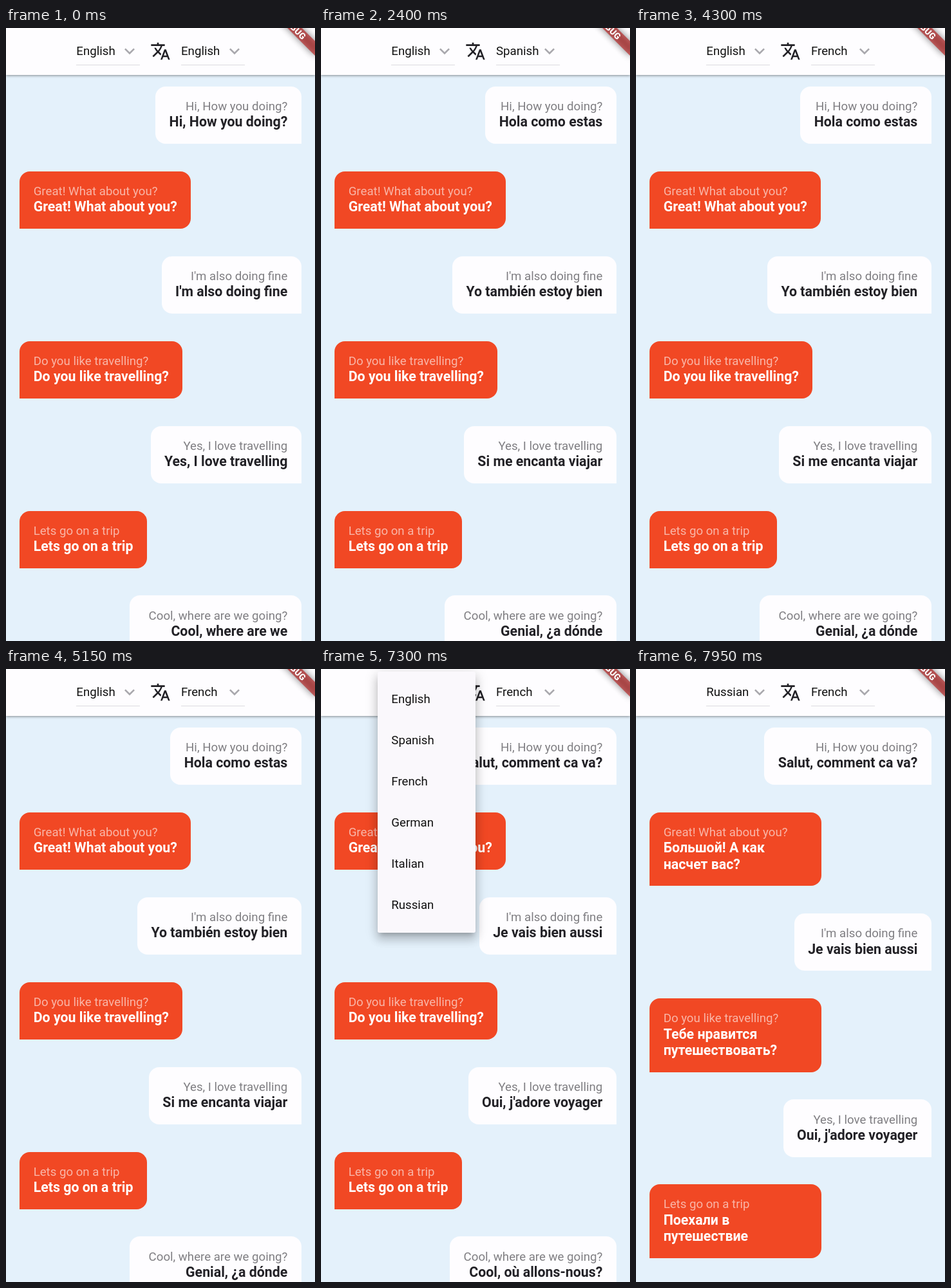
Recreate the animation shown at these times as an HTML page. Size 480 by 953 pixels, loop 8 s.

```html
<!DOCTYPE html>
<html lang="en">
<head>
<meta charset="utf-8">
<title>Chat translation</title>
<style>
html, body { margin: 0; width: 100%; height: 100%; overflow: hidden; }
body { position: relative; background: #e4f1fb; font: 18.667px/21.333px Roboto, sans-serif; color: #111; }
div, svg { position: absolute; box-sizing: border-box; white-space: pre; }
#chat { left: 21.333px; top: 90.667px; width: 437.333px; display: flex; flex-direction: column; align-items: flex-end; }
#chat div { position: static; }
#chat .bubble {
  padding: 21.333px; margin-bottom: 42.667px; text-align: right;
  background: #fefdff; border-radius: 16px 16px 0 16px;
}
#chat .red { align-self: flex-start; text-align: left; background: #f14824; border-radius: 16px 16px 16px 0; }
.plain { color: #7f7e82; }
.bold { font-weight: 700; font-size: 21.333px; line-height: 25.333px; color: #222126; }
.red .plain { color: rgba(255, 255, 255, .6); }
.red .bold { color: #fff; }
#bar { left: 0; top: 0; width: 100%; height: 73.3px; background: #fefdff; box-shadow: 0 1px 4px rgba(0, 0, 0, .45); }
.pick { top: 15px; width: 98.667px; height: 42.667px; line-height: 42.667px; border-bottom: 1.333px solid #dcdbe0; }
.pick svg { right: 0; top: 5.3px; }
.menu { top: 4.333px; width: 152px; height: 405.333px; }
.panel {
  left: 0; width: 100%; background: #faf8fc; border-radius: 2.667px;
  box-shadow: 0 6.7px 6.7px -4px rgba(0, 0, 0, .2), 0 10.7px 13.3px 1.3px rgba(0, 0, 0, .14), 0 4px 18.7px 2.7px rgba(0, 0, 0, .12);
}
.item { left: 21.333px; line-height: 64px; }
#corner { left: 480px; top: -32px; transform: rotate(45deg); transform-origin: 0 0; }
#corner div { left: -53.333px; top: 37.333px; width: 106.667px; height: 16px; }
#corner .shade { background: rgba(0, 0, 0, .5); filter: blur(5.3px); }
#corner .ribbon { background: rgba(183, 28, 28, .627); color: #fff; font-size: 13.6px; font-weight: 900; line-height: 16px; text-align: center; }
</style>
</head>
<body>
<div id="chat"></div>
<div id="bar">
  <svg style="left:224px;top:20px" width="32" height="32" viewBox="0 0 24 24" fill="#222126"><path d="M12.87 15.07l-2.54-2.51.03-.03c1.74-1.94 2.98-4.17 3.71-6.53H17V4h-7V2H8v2H1v1.99h11.17C11.5 7.92 10.44 9.75 9 11.35 8.07 10.32 7.3 9.19 6.69 8h-2c.73 1.63 1.73 3.17 2.98 4.56l-5.09 5.02L4 19l5-5 3.11 3.11.76-2.04zM18.5 10h-2L12 22h2l1.12-3h4.75L21 22h2l-4.5-12zm-2.62 7l1.62-4.33L19.12 17h-3.24z"/></svg>
</div>
<div id="corner"><div class="shade"></div><div class="ribbon">DEBUG</div></div>
<script>
const LOOP = 8000, STEP = 50;
const LANGS = ['English', 'Spanish', 'French', 'German', 'Italian', 'Russian'];
const ITEM = 64, PAD = 10.667, FULL = LANGS.length * ITEM + 2 * PAD;

// Even lines are replies on the right; each text starts at its language's time.
const LINES = [
  ['Hi, How you doing?', 'Hola como estas', 'Salut, comment ca va?'],
  ['Great! What about you?', 'Большой! А как\nнасчет вас?'],
  ["I'm also doing fine", 'Yo también estoy bien', 'Je vais bien aussi'],
  ['Do you like travelling?', 'Тебе нравится\nпутешествовать?'],
  ['Yes, I love travelling', 'Si me encanta viajar', "Oui, j'adore voyager"],
  ['Lets go on a trip', 'Поехали в\nпутешествие'],
  ['Cool, where are we\ngoing?', 'Genial, ¿a dónde\nvamos?', 'Cool, où allons-nous?']
];
const RIGHT_TIMES = [0, 2250, 5200], LEFT_TIMES = [0, 7750], STAGGER = 25;

const PICKS = [
  { x: 109.333, labels: [[0, 'English'], [7450, 'Russian']] },
  { x: 272, labels: [[0, 'English'], [2000, 'Spanish'], [4150, 'French']] }
];

// start: when growth begins; from: first visible; close: fade out begins
const MENUS = [
  { x: 250.667, sel: 0, start: 850, from: 900, close: 1975 },
  { x: 250.667, sel: 1, start: 3667, from: 3800, close: 4125 },
  { x: 88, sel: 0, start: 6366, from: 6450, close: 7425 }
];

const add = (parent, cls, text = '') => {
  const el = document.createElement('div');
  el.className = cls;
  el.textContent = text;
  parent.append(el);
  return el;
};
const clamp = v => Math.min(1, Math.max(0, v));
const span = (v, a, b) => clamp((v - a) / (b - a));
const mix = (a, b, p) => a + (b - a) * p;
const setText = (el, text) => { if (el.textContent !== text) el.textContent = text; };

const chat = document.getElementById('chat'), bar = document.getElementById('bar');
const corner = document.getElementById('corner');

const bubbles = LINES.map((texts, i) => {
  const box = add(chat, i % 2 ? 'bubble red' : 'bubble');
  add(box, 'plain', texts[0].replace('\n', ' '));
  return { box, bold: add(box, 'bold'), texts, times: i % 2 ? LEFT_TIMES : RIGHT_TIMES, lag: i * STAGGER };
});

for (const p of PICKS) {
  const box = add(bar, 'pick');
  box.style.left = p.x + 'px';
  p.label = document.createElement('span');
  box.append(p.label);
  box.insertAdjacentHTML('beforeend',
    '<svg width="32" height="32" viewBox="0 0 24 24" fill="#a9a8ad"><path d="M7.41 8.59L12 13.17l4.59-4.58L18 10l-6 6-6-6z"/></svg>');
}

for (const m of MENUS) {
  m.el = add(document.body, 'menu');
  m.el.style.left = m.x + 'px';
  m.panel = add(m.el, 'panel');
  m.items = LANGS.map((name, i) => {
    const item = add(m.el, 'item', name);
    item.style.top = PAD + i * ITEM + 'px';
    return item;
  });
}
document.body.append(corner);

function drawMenu(m, t) {
  const a = clamp((t - m.start) / 300);
  const fade = span(a, 0, .25) * (1 - span(t, m.close, m.close + 75));
  m.el.style.display = t >= m.from && fade > 0 ? '' : 'none';
  m.el.style.opacity = fade;
  const grow = span(a, .25, .5), edge = PAD + m.sel * ITEM;
  const top = mix(edge, 0, grow);
  m.panel.style.top = top + 'px';
  m.panel.style.height = mix(edge + ITEM, FULL, grow) - top + 'px';
  const unit = .5 / (LANGS.length + 1.5);
  m.items.forEach((item, i) => {
    const begin = .5 + (i + 1) * unit;
    item.style.opacity = i === m.sel ? 1 : span(a, begin, Math.min(1, begin + 1.5 * unit));
  });
}

function draw(now) {
  const t = Math.floor(now % LOOP / STEP) * STEP;
  for (const b of bubbles) {
    const k = b.times.filter(s => s === 0 || t >= s + b.lag).length - 1;
    setText(b.bold, b.texts[k]);
    b.box.style.width = b.texts[k].includes('\n') ? '266.667px' : '';
  }
  for (const p of PICKS) setText(p.label, p.labels.filter(l => t >= l[0]).pop()[1]);
  for (const m of MENUS) drawMenu(m, t);
}

const t0 = performance.now();
function tick() {
  draw(performance.now() - t0);
  requestAnimationFrame(tick);
}
tick();
</script>
</body>
</html>
```
